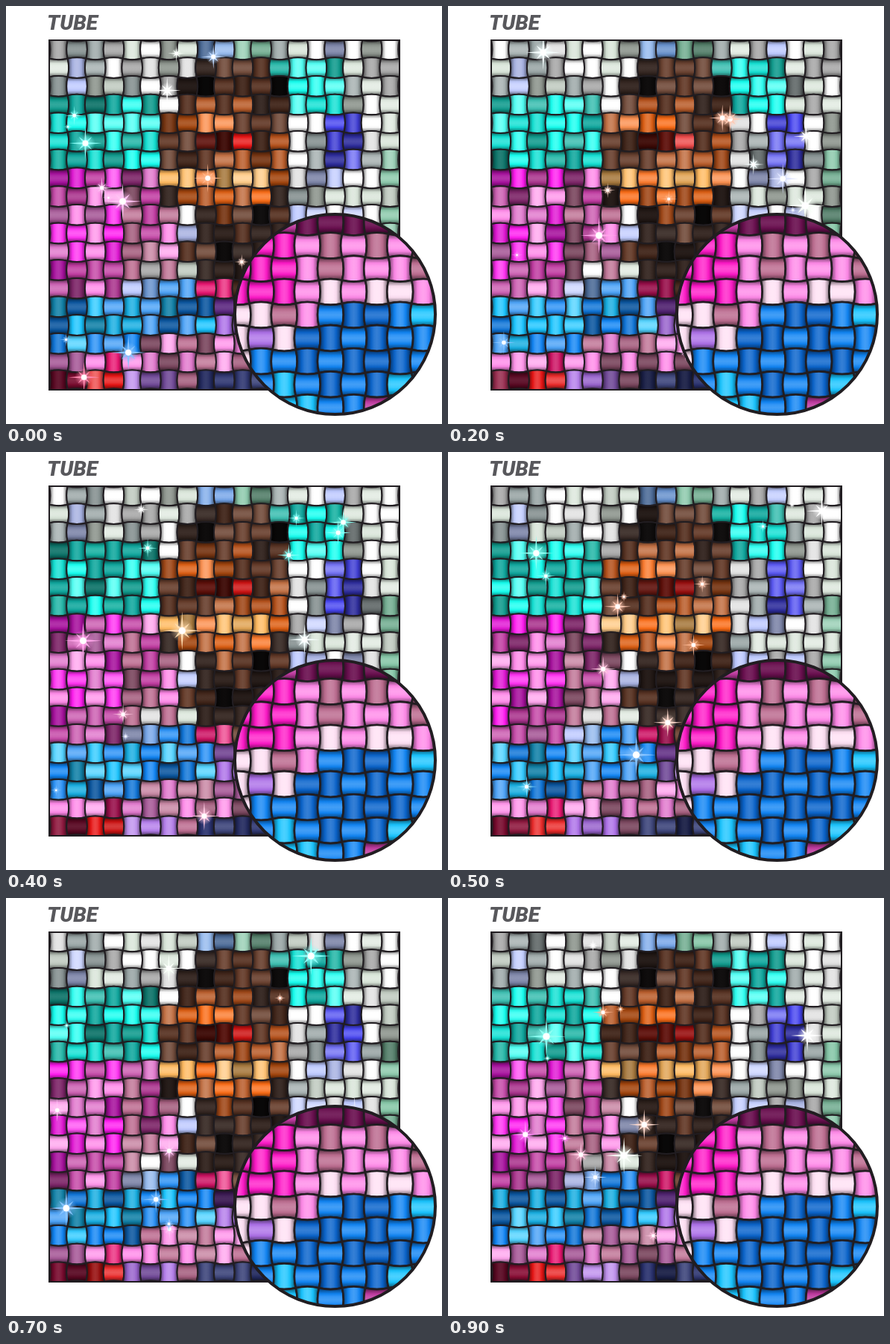
Write an HTML page with a canvas that moves like this. It is 585 px wide and 562 px high and loops after 1 s.

```html
<!DOCTYPE html>
<html lang="en">
<head>
<meta charset="utf-8">
<title>Tube</title>
<style>
  html, body { margin: 0; width: 100%; height: 100%; overflow: hidden; background: #fff; }
  canvas, svg { position: absolute; left: 0; top: 0; }
  text { font: italic 800 28px Roboto, Arial, sans-serif; fill: #58585c; }
</style>
</head>
<body>
<canvas id="stage" width="585" height="562"></canvas>
<svg width="585" height="562"><text x="55" y="32">TUBE</text></svg>
<script>
const ctx = document.getElementById('stage').getContext('2d');
const DARK = '#211d21';
const STEP = 100, STEPS = 10, GLINTS = 16;
const BOARD = { x: 58, y: 46, cell: 24.72, size: 470, count: 19 };
const LENS = { x: 441.5, y: 414.5, r: 134.5, cell: 31.1, left: 295.5, top: 275.5, count: 9 };

const PALETTE = {
  W: '#ffffff', w: '#d8e4d8', g: '#98a4a4', v: '#bcc8ff', G: '#82c4a4', b: '#74a4e8',
  T: '#12b0a0', C: '#14fff0', K: '#0c0a0a', d: '#33241f', n: '#643a28', o: '#b4501a',
  O: '#fa6a14', Y: '#ffb95e', r: '#5c0e08', R: '#e81414', M: '#ff18f0', m: '#c03aa0',
  P: '#ff88e8', p: '#ffe0f4', q: '#bc6c90', U: '#5c2880', u: '#ac70e8', B: '#1084f4',
  L: '#18c4ff', I: '#4644f0', N: '#28306c', X: '#e81470', x: '#880c34', k: '#6a1050',
  H: '#ff18c8', e: '#0a64cc'
};

const box = (left, top, right, bottom, keys) => ({
  keys, has: (c, r) => c >= left && c <= right && r >= top && r <= bottom
});
const oval = (x, y, rx, ry, keys) => ({
  keys, has: (c, r) => ((c - x) / rx) ** 2 + ((r - y) / ry) ** 2 < 1
});
const area = (keys, has) => ({ keys, has });

// Areas are painted in order, in cells; each tube picks one of its area's colours
const PORTRAIT = [
  box(0, 0, 18, 18, 'WwgvWw'),
  box(13, 4, 18, 12, 'WvgWwv'),
  box(18, 3, 18, 12, 'GwG'),
  box(15, 4, 16, 6, 'IvI'),
  box(0, 3, 5, 6, 'CTCC'),
  box(12, 1, 15, 3, 'CTC'),
  box(0, 7, 6, 13, 'MPmM'),
  box(4, 7, 6, 10, 'mPq'),
  oval(5, 12, 2, 1.3, 'pWqP'),
  box(4, 13, 7, 13, 'bBv'),
  box(0, 14, 11, 16, 'BLBL'),
  box(9, 14, 11, 15, 'uU'),
  box(5, 16, 11, 17, 'PqP'),
  box(0, 17, 4, 17, 'XPm'),
  box(0, 18, 3, 18, 'Rx'),
  box(4, 18, 7, 18, 'qu'),
  box(8, 18, 18, 18, 'NI'),
  box(8, 0, 12, 0, 'gGb'),
  oval(9.5, 2.2, 3, 1.6, 'dKn'),
  oval(10, 11, 3.2, 2.6, 'dKdn'),
  oval(9, 5.7, 4, 3.6, 'nod'),
  oval(9.4, 4.6, 2.6, 1.8, 'OoOn'),
  box(6, 7, 12, 7, 'YO'),
  box(7, 8, 11, 8, 'Oo'),
  box(8, 5, 10, 5, 'rR'),
  box(8, 13, 9, 13, 'XR')
];
const CLOSEUP = [
  box(0, 0, 8, 0, 'kmX'),
  box(0, 1, 3, 2, 'HHP'),
  box(4, 1, 8, 2, 'PqPq'),
  box(0, 3, 3, 3, 'HP'),
  box(4, 3, 8, 3, 'pPp'),
  box(0, 4, 8, 8, 'pqP'),
  box(0, 5, 3, 5, 'pu'),
  area('BLB', (c, r) => r > 3 && c + 2 * r >= 13),
  oval(5, 5.6, 2.4, 2, 'eB'),
  box(6, 8, 8, 8, 'Xm')
];

function noise(a, b, c) {
  const n = Math.sin(a * 127.1 + b * 311.7 + c * 74.7 + 5.3) * 43758.5453;
  return n - Math.floor(n);
}

const pick = (list, n) => list[Math.floor(n * list.length)];
const css = (c, a = 1) => `rgba(${c.map(Math.round).join()},${a})`;

// Below 1 darkens, above 1 blends towards white, less so for dark colours
function shade(c, k) {
  const gain = (k - 1) * Math.max(...c) / 255;
  return c.map(v => k <= 1 ? v * k : v + (255 - v) * gain);
}

function colorAt(areas, c, r) {
  const { keys } = areas.findLast(a => a.has(c, r));
  const hex = PALETTE[pick(keys, noise(c, r, 40))];
  return [1, 3, 5].map(i => parseInt(hex.slice(i, i + 2), 16));
}

function tube(x, y, s, color, wide, line) {
  const sag = s * 0.12, h = s / 2;
  const side = wide ? sag : -sag;
  ctx.beginPath();
  ctx.moveTo(x, y);
  ctx.quadraticCurveTo(x + h, y + side, x + s, y);
  ctx.quadraticCurveTo(x + s + side, y + h, x + s, y + s);
  ctx.quadraticCurveTo(x + h, y + s - side, x, y + s);
  ctx.quadraticCurveTo(x - side, y + h, x, y);
  const fill = wide
    ? ctx.createLinearGradient(0, y, 0, y + s)
    : ctx.createLinearGradient(x, 0, x + s, 0);
  for (let i = 0; i <= 8; i++) {
    fill.addColorStop(i / 8, css(shade(color, 0.36 + 0.86 * Math.sin(Math.PI * i / 8))));
  }
  ctx.fillStyle = fill;
  ctx.fill();
  ctx.strokeStyle = DARK;
  ctx.lineWidth = line;
  ctx.stroke();
}

function weave(areas, x, y, { cell, count }, line, odd, level) {
  for (let r = 0; r < count; r++) {
    for (let c = 0; c < count; c++) {
      const color = shade(colorAt(areas, c, r), level(c, r));
      tube(x + c * cell, y + r * cell, cell, color, (r + c) % 2 === odd, line);
    }
  }
}

function spike(r, w, angle) {
  ctx.save();
  ctx.rotate(angle);
  ctx.beginPath();
  ctx.moveTo(-r, 0);
  ctx.lineTo(0, -w);
  ctx.lineTo(r, 0);
  ctx.lineTo(0, w);
  ctx.fill();
  ctx.restore();
}

function glint(u, v, r) {
  const base = colorAt(PORTRAIT, Math.floor(u), Math.floor(v));
  const top = Math.max(...base);
  const tint = shade(base.map(n => n * 255 / top), 1.5);
  ctx.save();
  ctx.translate(BOARD.x + u * BOARD.cell, BOARD.y + v * BOARD.cell);
  const glow = ctx.createRadialGradient(0, 0, 0, 0, 0, r * 0.6);
  glow.addColorStop(0, '#fff');
  glow.addColorStop(0.25, css(tint, 0.75));
  glow.addColorStop(1, css(tint, 0));
  ctx.fillStyle = glow;
  ctx.fillRect(-r, -r, r * 2, r * 2);
  ctx.fillStyle = css(tint);
  for (let i = 0; i < 4; i++) {
    const long = i % 2 === 0;
    spike(long ? r : r * 0.55, long ? r * 0.075 : r * 0.1, i * Math.PI / 4);
  }
  ctx.fillStyle = '#fff';
  ctx.beginPath();
  ctx.arc(0, 0, r * 0.18, 0, Math.PI * 2);
  ctx.fill();
  ctx.restore();
}

function drawBoard(step) {
  const { x, y, size, count } = BOARD;
  const levels = [0.65, 0.88, 1, 1.1, 1.25];
  ctx.save();
  ctx.beginPath();
  ctx.rect(x, y, size, size);
  ctx.clip();
  weave(PORTRAIT, x, y, BOARD, 2, 1, (c, r) => pick(levels, noise(r, c, step)));
  for (let i = 0; i < GLINTS; i++) {
    const spot = axis => 0.3 + (count - 0.6) * noise(i, step, axis);
    glint(spot(1), spot(2), 5 + 21 * (1 - i / GLINTS));
  }
  ctx.restore();
  ctx.strokeStyle = DARK;
  ctx.lineWidth = 2;
  ctx.strokeRect(x, y, size, size);
}

function drawLens() {
  const ring = new Path2D();
  ring.arc(LENS.x, LENS.y, LENS.r, 0, Math.PI * 2);
  ctx.save();
  ctx.clip(ring);
  weave(CLOSEUP, LENS.left, LENS.top, LENS, 2.6, 0, () => 1);
  ctx.restore();
  ctx.strokeStyle = DARK;
  ctx.lineWidth = 4;
  ctx.stroke(ring);
}

let shown = -1;
function tick() {
  const step = Math.floor(performance.now() / STEP) % STEPS;
  if (step !== shown) {
    shown = step;
    ctx.clearRect(0, 0, 585, 562);
    drawBoard(step);
    drawLens();
  }
  requestAnimationFrame(tick);
}
tick();
</script>
</body>
</html>
```
